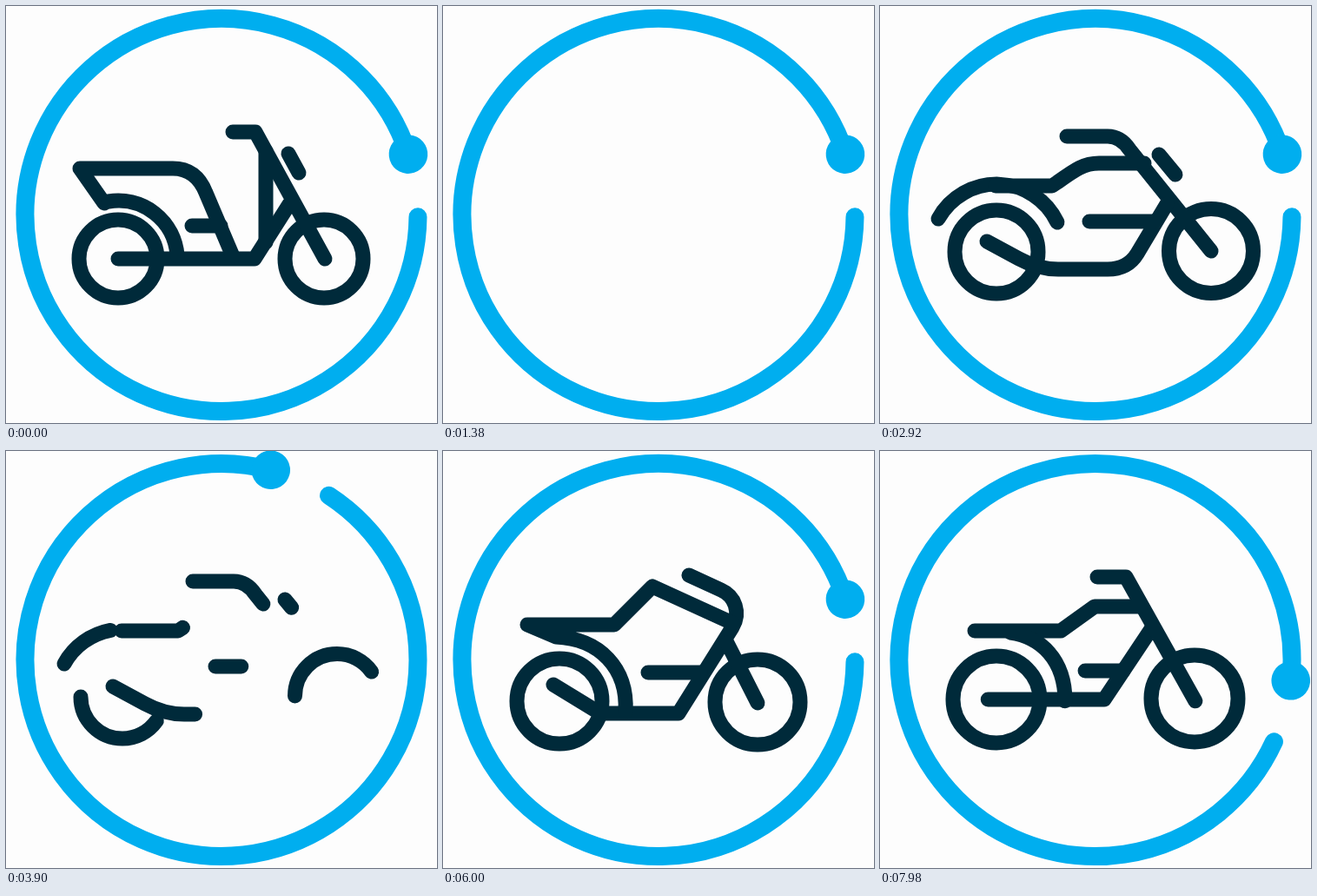
An HTML page for the animation above (8000 ms loop, 496 by 480 pixels).

```html
<!DOCTYPE html>
<html lang="en">
<head>
<meta charset="utf-8">
<title>Motorbikes</title>
<style>
  html, body { margin: 0; width: 100%; height: 100%; overflow: hidden; background: #fdfdfd; }
  svg { display: block; width: 100vw; height: 100vh; }
  path { fill: none; stroke-linecap: round; stroke-linejoin: round; }
  #arc { stroke: #00aeef; stroke-width: 21; }
  #knob { fill: #00aeef; }
  #bikes path { stroke: #002a3a; stroke-width: 17; }
</style>
</head>
<body>
<svg viewBox="0 0 496 480">
  <g id="ring">
    <path id="arc"/>
    <circle id="knob" cx="226" r="22.3"/>
  </g>
  <g id="bikes"></g>
</svg>
<script>
const LOOP = 8000;
const PERIOD = 64.3;      // steps from one bike to the next
const SWAP = 29.7;        // step at which the first bike is swapped
const REST_ANGLE = -18;
const RADIUS = 226;
const GAP = 18.6 * Math.PI / 180;

// A wheel starts at its leftmost point; sweep 1 is clockwise.
const wheel = (x, y, r, sweep) =>
  `M${x - r} ${y}a${r} ${r} 0 0 ${sweep} ${2 * r} 0a${r} ${r} 0 0 ${sweep} ${-2 * r} 0`;

const scooter = [
  wheel(129, 291, 45, 1),
  wheel(366, 291, 45, 0),
  'M129 291H286L326 228',
  'M367 291L287 145H261',
  'M299 167V272',
  'M261 288L230 215Q219 187 192 187H85L113 227',
  'M197 287A68 68 0 0 0 118 225',
  'M247 253H214',
  'M325 170L337 192'
];
const cruiser = [
  wheel(134, 283, 48, 0),
  wheel(381, 282, 48.5, 1),
  'M215 150H262Q277 150 287 165L381 282',
  'M67 245A77 77 0 0 1 204 249',
  'M133 207H198L204 203C225 188 235 181 252 181H304',
  'M123 271L160 291Q182 303 205 303H262Q285 303 296 285L330 228',
  'M241 248H315',
  'M321 171L340 194'
];
const sport = [
  wheel(134, 288, 49, 1),
  wheel(362, 289, 49, 1),
  'M127 269L181 302H271L333 203C343 186 336 167 320 160L283 143',
  'M210 300C213 250 180 216 130 214L97 200H197L241 156L333 198',
  'M362 290L327 221',
  'M236 255H296'
];
const trail = [
  wheel(134, 286, 50, 0),
  wheel(362, 285, 50, 1),
  'M124 286H258L312 205',
  'M363 288L283 145H250',
  'M300 179H247L208 207H109',
  'M213 288C213 240 185 214 150 209',
  'M236 253H280'
];

// Both curves run from 0 (hidden) past 1 and settle at 1, over steps since the start.
function backOut(age, duration, strength) {
  const x = Math.min(1, Math.max(0, 1 - age / duration));
  return 1 - x * x * ((strength + 1) * x - strength);
}
function springOut(age, period) {
  const t = Math.max(0, age);
  return 1 - Math.exp(-t) * Math.cos(2 * Math.PI * t / period);
}

// Steps last 20, 100 and 20 ms in turn.
function stepAt(ms) {
  const rest = ms % 140;
  return 3 * Math.floor(ms / 140) + (rest < 20 ? 0 : rest < 120 ? 1 : 2);
}

const ring = document.getElementById('ring');
document.getElementById('arc').setAttribute('d',
  `M${RADIUS * Math.cos(GAP)} ${RADIUS * Math.sin(GAP)}A${RADIUS} ${RADIUS} 0 1 1 ${RADIUS} 0`);

const bikeLayer = document.getElementById('bikes');
bikeLayer.innerHTML = [scooter, cruiser, sport, trail].map(paths =>
  `<g>${paths.map(d => `<path pathLength="100" d="${d}"/>`).join('')}</g>`).join('');
const bikes = [...bikeLayer.children];

// Overshooting lines lose their beginning instead of growing longer.
function trim(bike, amount) {
  const start = Math.max(0, amount - 1), end = Math.min(1, amount);
  const length = end - start;
  bike.style.visibility = length > 0.005 ? 'visible' : 'hidden';
  bike.style.strokeDasharray = length > 0.999 ? 'none' : `${100 * length} 300`;
  bike.style.strokeDashoffset = -100 * start;
}

function render(ms) {
  const cycles = (stepAt(ms) - SWAP) / PERIOD;
  const nearest = Math.round(cycles);
  // Leaving mirrors arriving, so only the distance to the swap matters.
  const distance = Math.abs(cycles - nearest) * PERIOD;
  const turn = springOut(distance - 10, 5.6);
  ring.setAttribute('transform',
    `translate(248 240.5) rotate(${REST_ANGLE + 360 * turn})`);

  const current = Math.floor(cycles) + 1;
  const drawn = backOut(distance - 10.27, 9.7, 3);
  bikes.forEach((bike, i) => trim(bike, i === current ? drawn : 0));
}

const begin = performance.now();
function tick() {
  render((performance.now() - begin) % LOOP);
  requestAnimationFrame(tick);
}
tick();
</script>
</body>
</html>
```
